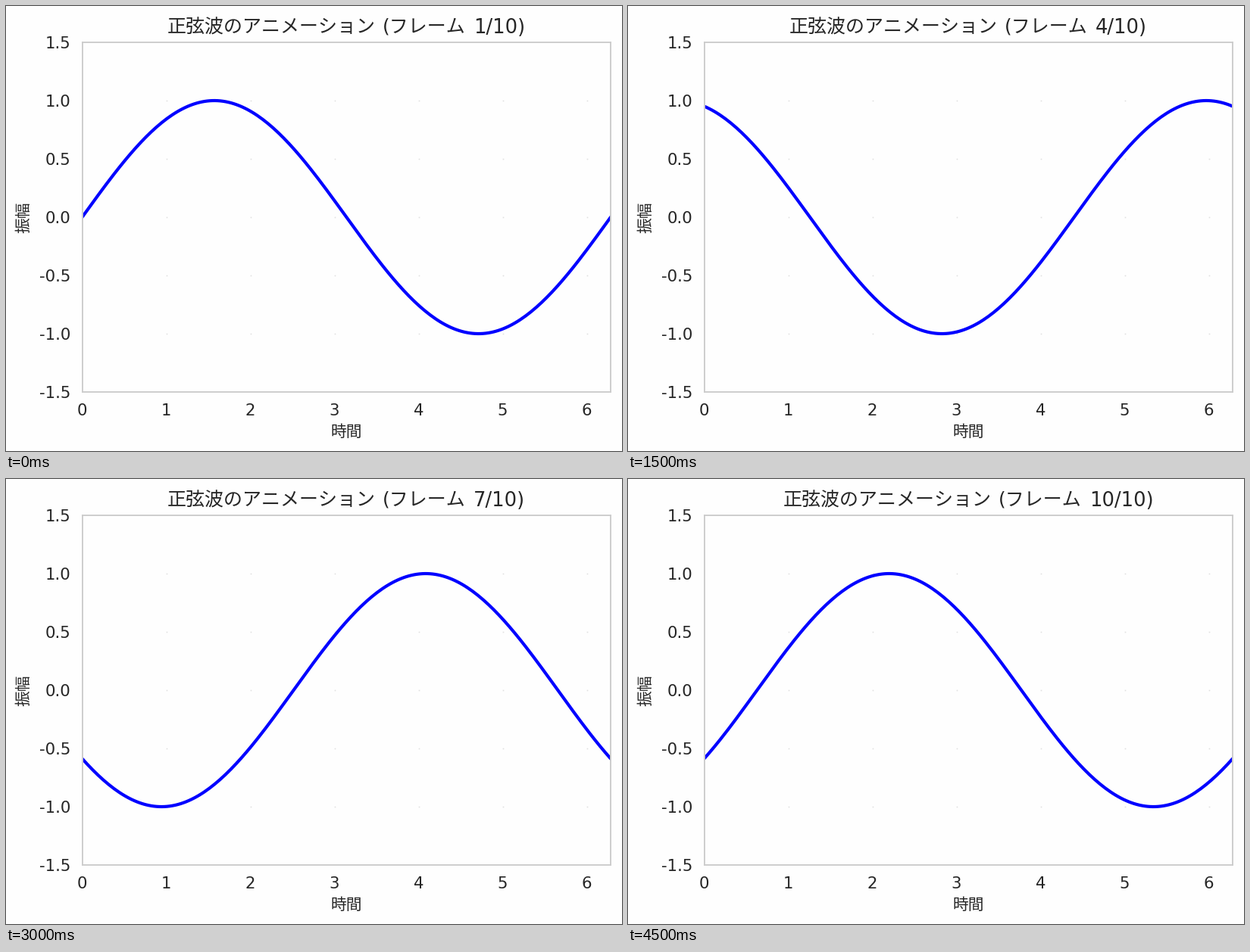
A matplotlib script that plays this animation: 813x588 px, repeating every 5000 ms.

```python
import numpy as np
import matplotlib.pyplot as plt
from matplotlib.animation import FuncAnimation

W, H, DPI = 813, 588, 128
LEFT, RIGHT, TOP, BOTTOM = 100.55, 798.05, 48, 510
STEPS = 10
INK, FRAME, PAPER = "#262626", "#cccccc", "#fefefe"

plt.rcParams["font.family"] = ["DejaVu Sans", "Noto Sans CJK JP"]


def pt(px):
    return px * 72 / DPI


def label(x, y, text, size, **kw):
    """Text with its baseline at pixel (x, y), measured from the top left."""
    return fig.text(x / W, 1 - y / H, text, fontsize=pt(size), color=INK,
                    va="baseline", **kw)


fig = plt.figure(figsize=(W / DPI, H / DPI), dpi=DPI, facecolor=PAPER)
ax = fig.add_axes([LEFT / W, 1 - BOTTOM / H,
                   (RIGHT - LEFT) / W, (BOTTOM - TOP) / H], facecolor=PAPER)
ax.set(xlim=(0, 2 * np.pi), ylim=(-1.5, 1.5), xticks=[], yticks=[])
for spine in ax.spines.values():
    spine.set(color=FRAME, linewidth=pt(1.9))

# Faint dots where the grid lines cross
gx, gy = np.meshgrid(np.arange(1, 7), np.arange(-1, 1.1, 0.5))
ax.plot(gx.ravel(), gy.ravel(), "s", ms=pt(1.6), mew=0, color="#e0e0e0",
        zorder=1)

for n in range(7):
    x = LEFT + (RIGHT - LEFT) * n / (2 * np.pi)
    label(x - 0.3, 541, str(n), 21.2, ha="center")
for v in np.arange(-1.5, 1.6, 0.5):
    y = BOTTOM - (BOTTOM - TOP) * (v + 1.5) / 3
    label(85, y + 7.7, f"{v:.1f}", 21.2, ha="right")

label(428.7, 568.5, "時間", 20.8)
label(29.4, 279.5, "振幅", 20.8, ha="center", rotation=90,
      rotation_mode="anchor")

# Title pieces with their left edges for a one-digit counter
pieces = [(label(x, y, text, size), x) for x, y, text, size in (
    (212.4, 36, "正弦波のアニメーション", 25),
    (497.2, 35, "(フレーム", 25),
    (616.8, 35.5, "", 25.8),
)]
count = pieces[-1][0]
HALF_DIGIT = 0.318 * 25

t = np.linspace(0, 2 * np.pi, 200)
wave, = ax.plot(t, np.sin(t), color="#0000ff", lw=pt(4.17), zorder=2)


def update(i):
    wave.set_ydata(np.sin(t + 2 * np.pi * i / STEPS))
    number = str(i + 1)
    count.set_text(f"{number}/{STEPS})")
    shift = HALF_DIGIT * (len(number) - 1)
    for piece, x in pieces:
        piece.set_x((x - shift) / W)
    return [wave] + [piece for piece, _ in pieces]


anim = FuncAnimation(fig, update, frames=STEPS, interval=500, repeat=True,
                     repeat_delay=0, blit=False)
plt.show()
```
